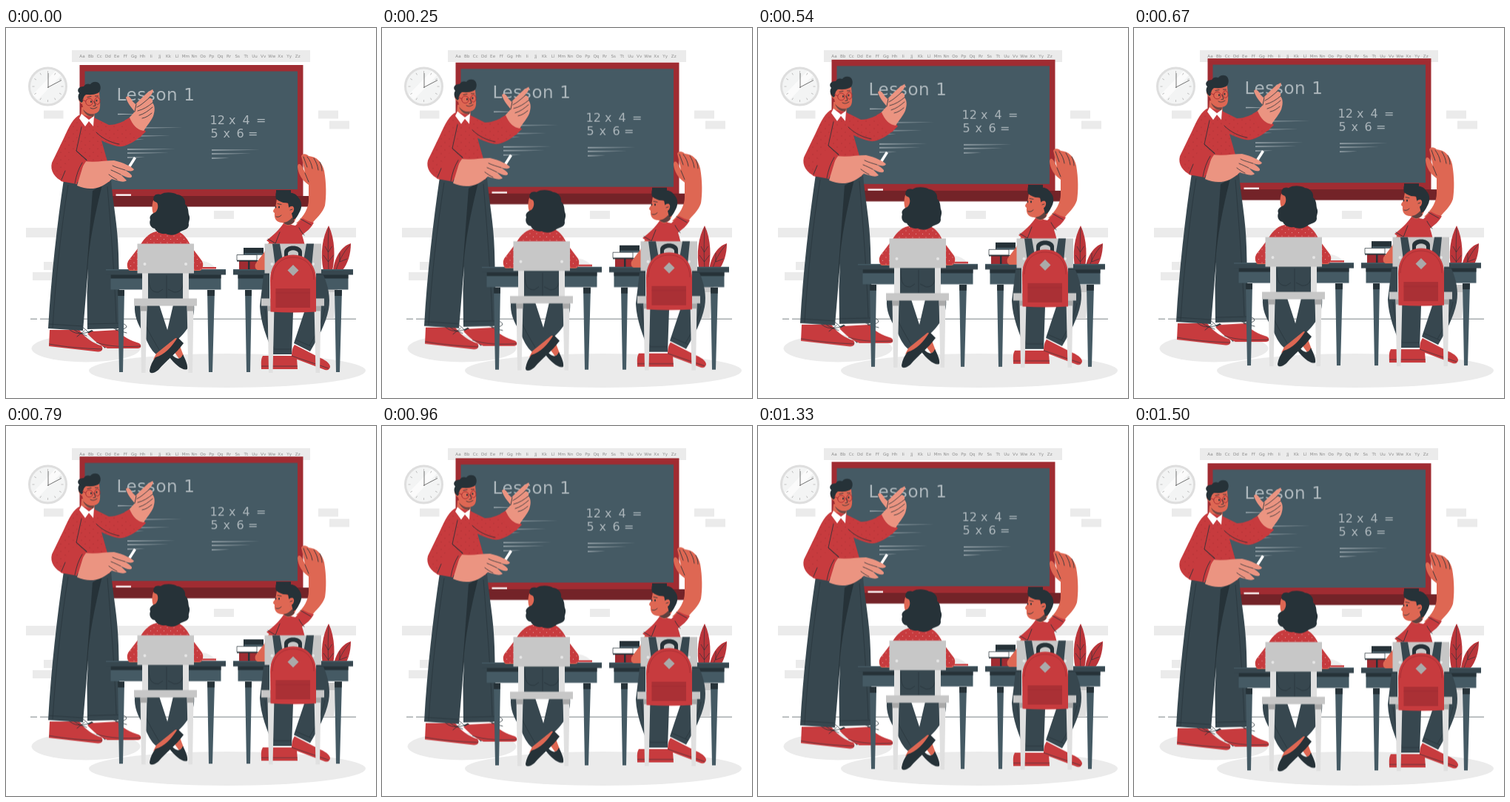
Animation of 500 by 500 pixels, one loop 1540 ms. Source, as an HTML page:

```html
<!DOCTYPE html>
<html lang="en">
<head>
<meta charset="utf-8">
<title>Classroom</title>
<style>
  html, body { margin: 0; width: 100%; height: 100%; overflow: hidden; background: #fff; }
  svg { display: block; width: 100vw; height: 100vh; }
  .wall { fill: #ebebeb; }
  .red { fill: #c73b3e; }
  .deep { fill: #a02c32; }
  .jeans { fill: #37474f; }
  .dark { fill: #263238; }
  .slate { fill: #455a64; }
  .steel { fill: #c7c7c7; }
  .pale { fill: #e0e0e0; }
  .skin { fill: #eb9481; }
  .tan { fill: #de6753; }
  .ink { fill: none; stroke: #263238; stroke-width: .8; stroke-linecap: round; stroke-linejoin: round; }
  .seam { fill: none; stroke: #263238; stroke-width: .6; }
  .crease { fill: none; stroke: #a02c32; stroke-width: .7; }
  .chalk { fill: #adb7bc; font-family: "DejaVu Sans", sans-serif; }
  .dust { fill: #a4afb5; }
  .abc { fill: #8d8d8d; font: 5.6px "DejaVu Sans", sans-serif; text-anchor: middle; }
</style>
</head>
<body>
<svg viewBox="0 0 500 500" xmlns="http://www.w3.org/2000/svg">
  <defs>
    <pattern id="dots" width="9" height="9" patternUnits="userSpaceOnUse">
      <g fill="#f3d2d0" opacity=".8"><circle cx="2" cy="2" r=".6"/><circle cx="6.500" cy="6.500" r=".6"/></g>
    </pattern>
    <pattern id="specks" width="11" height="10" patternUnits="userSpaceOnUse">
      <g fill="#96282d"><circle cx="3" cy="3" r=".5"/><circle cx="8" cy="8" r=".5"/></g>
    </pattern>
    <path id="sweater" d="M101 117c-10 3-16 17-23 32L62 182c-3 11 4 21 16 26h62l-3-28-8-28c11 5 21 9 28 8 11-2 23-11 32-20l-17-20c-13 6-22 11-33 11l-20-10z"/>
    <path id="blouse" d="M203 275c-12 3-17 11-22 19l-16 21c-2 5-1 11 3 12h20v10h56v-10h18c4-1 5-7 3-12l-15-20c-4-9-9-16-17-20z"/>
    <g id="desk">
      <path class="slate" d="M151 354h9l-2 111h-5zM272 354h10l-3 111h-5z"/>
      <path class="dark" d="M151 354h9l-.2 8h-8.600zM272 354h10l-.3 8h-9.400z"/>
      <path class="slate" d="M141.500 333h149v20.500h-149z"/>
      <path class="dark" d="M141.500 333h149v5.500h-149z"/>
      <path class="jeans" d="M135 326h162v7.500h-162z"/>
      <path class="slate" d="M135 326h162v1.500h-162z"/>
    </g>
    <g id="chair">
      <path class="pale" d="M181.500 375h9l-2 91h-5.500zM244.500 375h9l-1.500 91h-5.500zM184 330h8v38h-8zM239 330h8v38h-8z"/>
      <path class="steel" d="M173 365.500h85v10h-85z"/>
      <path fill="#a9a9a9" d="M181.500 375.500h9l-.2 7h-8.400zM244.500 375.500h9l-.2 7h-8.400z"/>
      <path class="steel" d="M177.500 291.500h76.500v40h-76.500z"/>
      <g fill="#e6e6e6"><circle cx="187.500" cy="319" r="2"/><circle cx="243" cy="319" r="2"/></g>
    </g>
  </defs>

  <g id="room">
    <path class="wall" d="M89 30h322v16h-322zM51 111.500h26.500v11h-26.500zM422 111.500h27v11h-27zM437 125.500h27v11h-27zM281 247h27v11h-27zM27 270h446v13h-446zM51 316h27v11h-27zM36 330h27v11h-27z"/>
    <g id="abc" class="abc"></g>
    <circle cx="56.500" cy="79" r="25" fill="#f3f4f4" stroke="#dedede" stroke-width="3"/>
    <path fill="#fff" opacity=".7" d="M36 90L67 58l7 6L43 97z"/>
    <g id="ticks" stroke="#b5b5b5" stroke-width=".8"></g>
    <path d="M57 61v20M56 80.500l19-10" fill="none" stroke="#666" stroke-width=".9"/>
    <path d="M33 393.200h9m4 0h280m4 0h118m3 0h22" stroke="#263238" stroke-width=".6"/>
    <ellipse class="wall" cx="108" cy="433" rx="73.500" ry="18.500"/>
    <ellipse class="wall" cx="299" cy="463" rx="187" ry="23"/>
    <path fill="#e0e0e0" d="M425 350h22l-4 43h-14z"/>
    <path class="steel" d="M423 347h25v10h-25z"/>
    <path fill="#ba353a" d="M436 267C428 282 424 304 429 328h12c4-18 4-42-5-61zM466 291c-13 4-22 19-24 37h12c8-9 12-23 12-37z"/>
    <path class="seam" d="M436 270c-1 20-1 40 0 57M431 295l4.500 8 5-8M429 307l6.500 9 7-9M465 293c-10 11-15 22-19 34M451 304v12l10-4"/>
  </g>

  <g id="float">
    <path class="deep" d="M99.500 50h302v178h-302z"/>
    <path class="slate" d="M106.500 58.500h287.500v159.500h-287.500z"/>
    <path fill="#732328" d="M137 227h273v14.500h-273z"/>
    <path fill="#fff" d="M148.500 224.500h20.500v2.300h-20.500z"/>
    <path class="dark" d="M365 219h20v7h-20z"/>
    <text class="chalk" x="149.500" y="97.500" font-size="23" letter-spacing=".6">Lesson 1</text>
    <g id="sums" class="chalk" font-size="16"></g>
    <g id="notes" class="dust"></g>

    <g id="teacher">
      <path class="dark" d="M110 411l6-3 20 18-2 7z"/>
      <path class="red" d="M59 408l-1 22 66 7.500c6 .5 8-4 5-8-12-4-21-10-30-21.500zM116 410l-6 3c8 9 17 16 27 20h41c5 0 6-4 2-7-12-4-22-8-29-18z"/>
      <path class="seam" d="M58 427c22 4 45 6 72 7M122 425c18 6 38 6 60 5"/>
      <path class="ink" d="M84 406c8 8 17 8 27 5-8-9-16-11-20-4 8 6 14 7 18 9M96 417l10-8M142 404c8 5 16 5 21 0-2-7-10-4-15 4l15 4"/>
      <path class="jeans" d="M78 205h64c2 30 9 60 10 100l2.500 101-44.500 1-.5-50 1.500-32-7 84-47-3c4-70 12-140 21-201z"/>
      <path class="dark" d="M117 220l13-8c-10 40-18 80-20 115l-2 15z"/>
      <path class="seam" d="M84 212C74 275 67 340 63 405M58 400l46 3M110 400l44-1M137 214c5 60 10 125 12 184M127 218l-2 12"/>
      <path class="tan" d="M102 107h17l1 20-10 6-9-14z"/>
      <path fill="#263238" opacity=".6" d="M104 110c6 6 10 7 15 6l-1 4c-6 0-11-3-14-10z"/>
      <path class="tan" d="M101 90c-5 3-3 11 2 13 1 7 6 13 14 13 8 0 11-5 10-16l-1-13z"/>
      <path class="dark" d="M99 98c-2-4-2-7 0-10-4-4-1-9 6-9 2-4 6-4 9-3 3-4 9-4 12-1 3 4 2 11-2 13-6 3-12 2-16 2-3 2-4 5-4 9l-2 2z"/>
      <g fill="none" stroke="#a92f35" stroke-width="1"><path d="M103 97l5 2"/><circle cx="112.500" cy="100" r="4.800"/><ellipse cx="123.500" cy="98.500" rx="3.500" ry="4.700"/></g>
      <g class="dark"><ellipse cx="115" cy="99.500" rx=".9" ry="1.500"/><ellipse cx="122.500" cy="98" rx=".9" ry="1.500"/></g>
      <path class="ink" d="M110 93.500l5-1M120.500 92h4M119 99l2 6-3 .5M114 108c3 2 6 1 9-1"/>
      <use class="red" href="#sweater"/>
      <use href="#sweater" fill="url(#specks)"/>
      <path class="ink" d="M102 134l-7 32 14 12M122 141c9 9 20 14 31 16"/>
      <path fill="#fff" d="M102 116l-3 6 8 11 5-7 6 7 1-14-7 5z"/>
      <path class="skin" d="M165 123l9-10c-5-6-10-12-12-19 2-4 6-1 9 5l4 4c8-8 16-17 23-20 3 2-2 8-6 12 5-1 7 2 6 6 4 5 3 12 1 18-3 7-8 12-13 20-8-1-16-8-21-16z"/>
      <path class="ink" d="M174 113l2-10M177 107c6-3 10-7 16-12M178 112c8-2 14-6 20-11M180 118c7-2 12-6 18-11M184 122c6-1 9-4 13-7"/>
      <path class="red" d="M160 125l7-4c4 10 11 17 20 20l-6 7c-11-3-18-11-21-23z"/>
      <path fill="none" stroke="#fff" stroke-width="3.600" d="M165 190l9.500-15"/>
      <path class="skin" d="M106 180c15 2 28-1 40-1 13 3 23 8 27 12-1 3-6 3-12 1 6 4 10 7 9 9-2 3-9 0-15-3l8 8c-4 4-13 0-20-2-13 13-29 17-47 9z"/>
      <path class="ink" d="M144 186c6 3 11 4 17 6M142 192c5 2 9 4 13 6M139 198c4 3 7 5 11 7"/>
      <path class="red" d="M94 170l15 9c-7 9-11 20-13 32l-22-4c3-16 9-30 20-37z"/>
      <path class="ink" d="M103 182c-5 8-8 17-10 28M95 166l14 13M75 205l5-12"/>
    </g>

    <use href="#desk"/>
    <g id="girl">
      <path fill="#ededed" d="M253 318c9-5 20-4 29 5l-4 2h-25z"/>
      <path class="red" d="M262 323h22v2.500h-22z"/>
      <path class="tan" d="M199 233c-2 6-2 13 0 18l3 2 8-3-2-18zM205 262h30v20h-30zM164 317h16v11h-12c-3 0-5-5-4-11zM252 317h14c1 6-1 11-5 11h-9z"/>
      <use class="red" href="#blouse"/>
      <use href="#blouse" fill="url(#dots)"/>
      <path class="dark" d="M200 234c-3-8 4-11 9-9 6-4 17-3 22 0 8 1 12 7 11 13 5 4 4 10 5 14 3 6-1 10 0 14 0 6-7 7-11 9-6 5-14 6-20 3-8 1-13-3-15-7-6-1-8-7-6-12-2-5 2-8 7-10 4-4 4-10 2-13z"/>
      <path class="jeans" d="M187 331h60v36h-60z"/>
      <path class="jeans" d="M226 374h28c2 18-8 34-22 47l-15-8z"/>
      <path class="tan" d="M226 436l8-9 6 16-6 4z"/>
      <path class="dark" d="M224 441c6 7 12 8 15 0 4 8 7 15 6 20-6 3-17-7-24-16z"/>
      <path class="jeans" d="M174 374h33l12 37 11 8-27 22c-7-5-12-16-17-28-8-13-13-24-12-39z"/>
      <path class="seam" d="M193 334c0 18 3 23 13 23l6-4M240 334c0 18-3 23-13 23l-8-4M217 334v31M180 378c6 22 16 38 27 57"/>
      <path class="tan" d="M203 440l26-21 5 1-20 22-15 6z"/>
      <path class="dark" d="M232 418l8 8c-11 15-23 23-34 36-6 5-12 6-12 1 1-7 4-13 8-18 12-3 22-14 30-27z"/>
    </g>
    <use href="#chair"/>

    <use href="#desk" x="172"/>
    <g id="boy">
      <path class="dark" d="M321 297h27v9.500h-27z"/>
      <path class="slate" d="M322 304h25v2.500h-25z"/>
      <path class="deep" d="M315 315h24v11h-24z"/>
      <path fill="#fff" stroke="#263238" stroke-width=".7" d="M312 306.500h27v7.500h-27z"/>
      <path class="dark" d="M312 314h30v1.500h-30zM327 315h2.500v11h-2.500z"/>
      <path class="tan" d="M356 288l-7 15-12 16c-1 4 0 7 3 8h18l10-25z"/>
      <path class="tan" d="M392 264c11-10 17-21 17-32v-20c-9-6-14-15-15-24 0-6 4-5 6-1l4 8-5-22c2-4 7-3 10 0 11 1 18 8 21 20 3 17 3 35 1 47-3 10-12 17-19 26z"/>
      <path class="ink" d="M404 196l5 12M407 174c4 5 6 10 7 16M416 176c3 5 5 9 6 16M424 181c2 4 3 8 3 12M402 174l5 14"/>
      <path class="red" d="M352 287c8-6 17-14 23-23l16 3 10-10c5 3 9 5 15 6-4 8-10 12-16 17 4 11 6 25 6 36l-1 15h-46l5-35z"/>
      <path class="ink" d="M396 270c2 4 5 8 7 10M363 294l7-18M354 285l10 6M398 258l14 8"/>
      <path class="tan" d="M366 231c-1 5-1 9-3 13-3 3-2 5 0 6-1 8 3 13 10 13l3 1c4 5 9 3 13-1l3-6-6-18z"/>
      <path class="dark" d="M375 263c6-1 9-4 12-7l3 5c-4 5-9 7-14 3z" opacity=".7"/>
      <path class="dark" d="M365 231c-1-4-1-8 1-12 3 4 8 1 12 4 9-2 15 2 17 6 6 6 5 15 1 21-2 4-4 8-8 9l-3-13c-3-1-3-6-4-10-6 1-11-1-16-5z"/>
      <path class="tan" d="M382 243c4-4 8-2 7 3-1 4-4 6-7 5z"/>
      <g class="dark"><ellipse cx="369" cy="242" rx="1" ry="1.600"/><ellipse cx="364.500" cy="242" rx=".7" ry="1.400"/></g>
      <path class="ink" d="M367 237.500l5 1M365 255c3 1 5 0 7-2M384 246l3-1"/>
      <path class="red" d="M347 443h39l7 3 1 15h-49c0-8-1-13 2-18zM390 428l29 15c8 4 17 7 19 14 0 4-3 6-7 5l-45-17c0-8 1-13 4-17z"/>
      <path class="seam" d="M345 457h49M386 443l50 17"/>
      <path class="jeans" d="M348 334h40v50l-2 57h-25c-8-22-17-42-18-65zM388 334h41c6 14 10 30 7 46-4 20-14 38-25 57l-22-11 14-42h-15z"/>
      <path class="seam" d="M361 434h25M391 421l23 10M350 379c2 20 6 38 12 54M431 379c-4 18-11 34-21 50"/>
    </g>
    <use href="#chair" x="172"/>
    <g id="bag">
      <path class="jeans" d="M360 291.500h10l4 23-10 8zM406 291.500h10l-3 31-11-8z"/>
      <path class="dark" d="M376 311v-9c1-10 23-10 24 0v9h-5v-7c-2-5-12-5-14 0v7z"/>
      <path class="red" d="M357.500 383.500l-.5-43c0-19 11-34 31-34s31 15 31 34v43q-31 2-61.500 0z"/>
      <path class="deep" d="M364.500 352h46.500v26h-46.500z" opacity=".75"/>
      <path class="crease" d="M364.500 358h46.500M360 340c0-17 10-30 28-30s28 13 28 30"/>
      <path fill="#aaa" d="M388 320l7.500 7.500-7.500 7.500-7.500-7.500z"/>
    </g>
  </g>
</svg>
<script>
  const byId = id => document.getElementById(id);
  const add = (parent, tag, attrs, text = '') => {
    const el = document.createElementNS('http://www.w3.org/2000/svg', tag);
    for (const key in attrs) el.setAttribute(key, attrs[key]);
    el.textContent = text;
    byId(parent).append(el);
  };

  [...'ABCDEFGHIJKLMNOPQRSTUVWXYZ'].forEach((c, i) =>
    add('abc', 'text', { x: 103 + i * 11.65, y: 40.3 }, c + c.toLowerCase()));

  for (let i = 0; i < 12; i++)
    add('ticks', 'path', { d: 'M56.5 58v3', transform: `rotate(${i * 30} 56.5 79)` });

  const sums = [
    [130, [['12', 275.5], ['x', 301], ['4', 319.5], ['=', 338]]],
    [147.5, [['5', 276.5], ['x', 293.5], ['6', 311.5], ['=', 327]]]
  ];
  for (const [y, marks] of sums)
    for (const [mark, x] of marks) add('sums', 'text', { x, y }, mark);

  // Chalk rules taper towards the right: x, y, length
  const rules = [
    [151, 116.5, 30], [164, 135, 74], [164, 146, 58], [164, 151, 23],
    [164, 164, 65], [164, 169, 56], [164, 175, 24],
    [278, 165, 65], [278, 170, 53], [278, 176, 24]
  ];
  for (const [x, y, w] of rules)
    add('notes', 'path', { d: `M${x} ${y - .7}l${w} .4l${-w} 1.1z` });

  const lift = [[0, 0], [720, -9.6], [1480, .4], [1540, .4]];
  byId('float').animate(
    lift.map(([t, y]) => ({ offset: t / 1540, transform: `translateY(${y}px)` })),
    { duration: 1540, iterations: Infinity, iterationStart: .004, easing: 'steps(37, end)' }
  );
</script>
</body>
</html>
```
